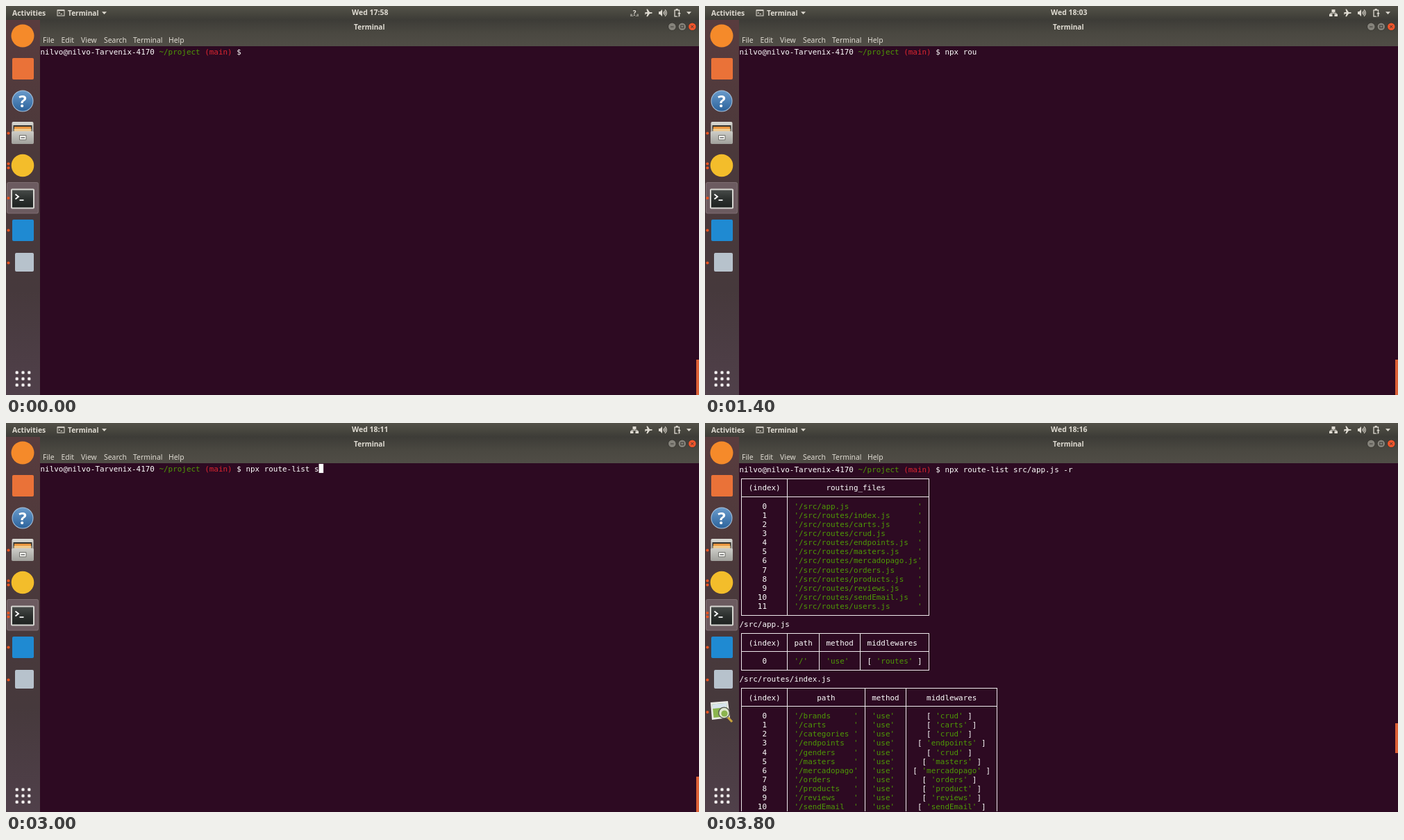
Animation, 998 px wide and 561 px high, one loop 6800 ms. Source, as an HTML page with a canvas:

```html
<!DOCTYPE html>
<html lang="en">
<head>
<meta charset="utf-8">
<title>Terminal</title>
<style>
  html, body { margin: 0; width: 100%; height: 100%; overflow: hidden; background: #2d0a22; }
  canvas { display: block; width: 998px; height: 561px; }
</style>
</head>
<body>
<canvas id="stage" width="998" height="561"></canvas>
<script>
const ctx = document.getElementById('stage').getContext('2d');
const W = 998, H = 561, LOOP = 6800, STEP = 200, RESULT_AT = 3800;
const CELL = 6.575, LINE = 13.15, LEFT = 49.5;
const MONO = '10.92px "DejaVu Sans Mono", monospace';
const SANS = '"Noto Sans", "Open Sans", sans-serif';
const WHITE = '#fff', GREEN = '#4e9a06', RED = '#dc2530', ORANGE = '#e95420', PALE = '#dfdbd2';

const PROMPT = [
  ['nilvo@nilvo-Tarvenix-4170 ', WHITE], ['~/project ', GREEN], ['(main) ', RED], ['$ ', WHITE]
];
const COMMAND = 'npx route-list src/app.js -r';

// [time, value] lists: typed length is interpolated, the others hold
const TYPED = [[0, 0], [1800, 9], [2000, 11], [3000, 16], [3600, 28]];
const CLOCK = [[0, '17:58'], [400, '17:59'], [800, '18:00'], [1000, '18:02'], [1200, '18:03'],
  [1600, '18:09'], [2000, '18:10'], [2600, '18:11'], [3200, '18:12'], [3400, '18:13'], [3800, '18:16']];
const ONLINE = [[0, false], [1200, true], [1600, false], [2400, true]];
const CURSOR = [[0, false], [200, true], [1400, false], [1600, true]];

const held = (list, t) => list.filter(k => k[0] <= t).pop()[1];

function typedLength(t) {
  const i = TYPED.findIndex(k => k[0] > t);
  if (i < 0) return COMMAND.length;
  const [t0, a] = TYPED[i - 1], [t1, b] = TYPED[i];
  return Math.round(a + (b - a) * (t - t0) / (t1 - t0));
}

function rect(x, y, w, h, fill, r = 0) {
  ctx.fillStyle = fill;
  ctx.beginPath();
  ctx.roundRect(x, y, w, h, r);
  ctx.fill();
}

function disc(x, y, r, fill) {
  ctx.fillStyle = fill;
  ctx.beginPath();
  ctx.arc(x, y, r, 0, Math.PI * 2);
  ctx.fill();
}

function poly(points, fill) {
  ctx.fillStyle = fill;
  ctx.beginPath();
  points.forEach(p => ctx.lineTo(...p));
  ctx.fill();
}

function stroke(points, color, width = 1) {
  ctx.strokeStyle = color;
  ctx.lineWidth = width;
  ctx.beginPath();
  points.forEach(p => ctx.lineTo(...p));
  ctx.stroke();
}

function fade(y0, y1, ...stops) {
  const g = ctx.createLinearGradient(0, y0, 0, y1);
  stops.forEach(([at, color]) => g.addColorStop(at, color));
  return g;
}

function label(text, x, y, font, color = PALE, align = 'left') {
  ctx.font = font;
  ctx.fillStyle = color;
  ctx.textAlign = align;
  ctx.fillText(text, x, y);
}

function caret(x, y) {
  poly([[x - 3.5, y - 1.8], [x + 3.5, y - 1.8], [x, y + 2]], PALE);
}

// ---- top panel and title bar ----

function networkIcon(online) {
  const color = online ? PALE : '#8d8b83';
  rect(902.5, 5, 5, 4, color);
  rect(899, 11.5, 4.5, 3.5, color);
  rect(906.5, 11.5, 4.5, 3.5, color);
  if (online) {
    stroke([[901, 12], [901, 10.3], [909, 10.3], [909, 12]], color);
    stroke([[905, 9], [905, 10.3]], color);
  } else {
    rect(902, 4, 6.5, 10, '#47463f');
    label('?', 905.2, 13.5, `bold 10px ${SANS}`, PALE, 'center');
  }
}

function statusIcons(online) {
  networkIcon(online);
  poly([[920, 8.9], [923.6, 8.9], [922.4, 4.6], [924, 4.6], [927, 8.9], [930, 9], [931, 9.9], [930, 10.8],
    [927, 10.9], [924, 15.2], [922.4, 15.2], [923.6, 10.9], [921.8, 10.9], [920.8, 12.2], [920, 12.2], [920.6, 9.9]], PALE);
  poly([[940, 8], [942, 8], [945, 5], [945, 15], [942, 12], [940, 12]], PALE);
  ctx.strokeStyle = PALE;
  ctx.lineWidth = 1.1;
  for (const r of [2, 4, 6]) {
    ctx.beginPath();
    ctx.arc(945.3, 10, r, -0.9, 0.9);
    ctx.stroke();
  }
  ctx.lineWidth = 1.3;
  ctx.strokeRect(963, 6, 6.5, 9);
  rect(964.7, 4, 3, 2, PALE);
  rect(966.5, 8.5, 6, 7, '#45443d');
  poly([[969.5, 8.5], [972, 11.3], [970.3, 11.3], [970.3, 15], [968.7, 15], [968.7, 11.3], [967, 11.3]], PALE);
  caret(983.5, 10);
}

function topBars(t) {
  const bold = `bold 10.4px ${SANS}`;
  rect(0, 0, W, 20, fade(0, 20, [0, '#535149'], [0.5, '#48473f'], [1, '#3d3c37']));
  rect(49, 20, 949, 38, fade(20, 58, [0, '#3d3c37'], [0.5, '#4a4841'], [1, '#504d46']));
  label('Activities', 9, 13.6, bold);
  ctx.strokeStyle = PALE;
  ctx.lineWidth = 1;
  ctx.strokeRect(74, 6, 10, 8);
  rect(74, 5.5, 10, 1.6, PALE);
  stroke([[75.8, 8.5], [77.5, 9.8], [75.8, 11]], PALE);
  stroke([[78.5, 11.5], [81, 11.5]], PALE);
  label('Terminal', 89, 13.6, `bold 10.1px ${SANS}`);
  caret(141.5, 10);
  label('Wed ' + held(CLOCK, t), 524.3, 13.4, `bold 10.5px ${SANS}`, PALE, 'center');
  statusIcons(held(ONLINE, t));

  label('Terminal', 523.3, 33.6, `bold 10.1px ${SANS}`, PALE, 'center');
  for (const [x, color] of [[959.3, '#85837b'], [973.8, '#85837b'], [988.3, '#f0552b']]) {
    disc(x, 29.8, 6, '#35342f');
    disc(x, 29.8, 5.3, color);
  }
  const ink = '#3c3b37';
  stroke([[957, 30], [961.6, 30]], ink);
  ctx.strokeRect(971.8, 28, 4, 3.6);
  stroke([[986.4, 27.9], [990.2, 31.7]], ink);
  stroke([[990.2, 27.9], [986.4, 31.7]], ink);

  const menu = { File: 53, Edit: 79.5, View: 108, Search: 141, Terminal: 183, Help: 234 };
  for (const name in menu) label(name, menu[name], 53.2, `10.4px ${SANS}`);
}

// ---- dock ----

function helpIcon() {
  disc(24, 137, 15.5, '#a9c4de');
  disc(24, 137, 14.5, fade(122, 152, [0, '#6a9bcb'], [1, '#2c639c']));
  label('?', 24, 145.5, 'bold 24px "Noto Sans", sans-serif', WHITE, 'center');
}

function filesIcon() {
  rect(8.5, 167, 31, 32, fade(167, 199, [0, '#d8d8d3'], [1, '#8e8e89']), 2);
  rect(10.5, 172, 27, 10, '#35322d');
  rect(12, 174, 24, 3, '#e8953f');
  rect(11.5, 177, 25, 5, '#f0c98a');
  rect(8, 180.5, 32, 18.5, fade(180, 199, [0, '#cfcfca'], [1, '#a0a09b']), 2);
  rect(19, 186, 10.5, 7.5, '#6f6f6a', 1);
  rect(20, 187, 8.5, 5.5, '#f4f4f0');
  rect(21.5, 189, 5.5, 1.6, '#777');
}

function terminalIcon() {
  rect(1, 254, 46, 45.5, '#7d6d71', 3);
  rect(2, 255, 44, 43.5, '#6c5b60', 2);
  rect(7, 263.5, 34, 29, '#d6d6d1', 2);
  rect(9, 265.5, 30, 25, fade(265, 291, [0, '#474b49'], [0.5, '#2c302e'], [1, '#1e2220']));
  stroke([[13.5, 271.5], [18, 275], [13.5, 278.5]], WHITE, 1.8);
  stroke([[19.5, 280], [25.5, 280]], WHITE, 1.7);
}

function viewerIcon() {
  poly([[8, 403], [33, 401], [36, 425], [10, 428]], '#ecece8');
  poly([[10.5, 405.5], [31, 403.8], [33, 423], [12.5, 425]], '#8bb44e');
  poly([[10.5, 405.5], [31, 403.8], [31.6, 410], [11.2, 412]], '#d8e4ec');
  stroke([[33, 424.5], [39, 431]], '#c8a43c', 3.2);
  disc(27.5, 418, 8.5, '#55584f');
  disc(27.5, 418, 7.2, '#dfe8cf');
  disc(28, 419, 4.6, '#8bb44e');
}

function dock(t) {
  rect(0, 20, 49, 541, fade(20, 561, [0, '#593c3e'], [0.35, '#4b393b'], [0.72, '#46393c'], [1, '#50404a']));
  disc(24, 43, 16.5, '#f58a2a');
  rect(9, 75, 31, 31, '#ea7238', 2);
  helpIcon();
  filesIcon();
  disc(24, 230, 16.3, '#f3bd2b');
  terminalIcon();
  rect(9, 308, 31, 31, '#1f8ad2', 2);
  rect(13, 356, 27, 27, '#b7c2cc', 2);
  const done = t >= RESULT_AT;
  if (done) viewerIcon();

  const shells = t >= 1800 ? [274, 279.5] : [277];
  const running = [183.5, 227.5, 233.5, ...shells, 323.5, 370.5];
  if (done) running.push(417);
  running.forEach(y => disc(3.5, y, 2.1, ORANGE));
  for (let i = 0; i < 9; i++) {
    rect(13.6 + (i % 3) * 8.8, 526.6 + Math.floor(i / 3) * 9, 4.2, 4.2, '#f4f0f0', 1.4);
  }
}

// ---- terminal ----

let top0;

function write(text, col, row, color = WHITE) {
  ctx.font = MONO;
  ctx.fillStyle = color;
  ctx.textAlign = 'left';
  [...text].forEach((ch, i) => {
    if (ch !== ' ') ctx.fillText(ch, LEFT + (col + i) * CELL, top0 + row * LINE + 10.6);
  });
}

function commandLine(length) {
  let col = 0;
  for (const [text, color] of PROMPT) {
    write(text, col, 0, color);
    col += text.length;
  }
  write(COMMAND.slice(0, length), col, 0);
  return col + length;
}

const quoted = (name, width = 0) => `'${name.padEnd(width)}'`;

// Quoted parts are green, everything around them white
function writeCell(text, col, row) {
  let at = col;
  for (const part of text.split(/('[^']*')/)) {
    write(part, at, row, part[0] === "'" ? GREEN : WHITE);
    at += part.length;
  }
}

function table(row, widths, head, rows) {
  const lineX = col => Math.floor(LEFT + (col + 0.5) * CELL);
  const lineY = r => Math.floor(top0 + (r + 0.5) * LINE);
  const edges = [0];
  widths.forEach(w => edges.push(edges[edges.length - 1] + w + 1));
  const last = row + 3 + rows.length;
  const x0 = lineX(0), x1 = lineX(edges[edges.length - 1]);
  for (const r of [row, row + 2, last]) rect(x0, lineY(r), x1 - x0 + 1, 1, '#eee9ec');
  for (const e of edges) rect(lineX(e), lineY(row), 1, lineY(last) - lineY(row), '#eee9ec');
  const line = (cells, r) => cells.forEach((text, i) =>
    writeCell(text, edges[i] + 1 + Math.floor((widths[i] - text.length) / 2), r));
  line(head, row + 1);
  rows.forEach((cells, i) => line([String(i), ...cells], row + 3 + i));
}

const FILES = 'index carts crud endpoints masters mercadopago orders products reviews sendEmail users'.split(' ');
const ROUTES = ('brands:crud carts:carts categories:crud endpoints:endpoints genders:crud masters:masters ' +
  'mercadopago:mercadopago orders:orders products:product reviews:reviews sendEmail:sendEmail users:users').split(' ');

function results() {
  const paths = ['/src/app.js', ...FILES.map(f => `/src/routes/${f}.js`)];
  const head = ['(index)', 'path', 'method', 'middlewares'];
  table(1, [9, 30], ['(index)', 'routing_files'], paths.map(p => [quoted(p, 26)]));
  write(paths[0], 0, 17);
  table(18, [9, 6, 8, 14], head, [["'/'", "'use'", "[ 'routes' ]"]]);
  write(paths[1], 0, 23);
  table(24, [9, 16, 8, 19], head, ROUTES.map(r => {
    const [path, handler] = r.split(':');
    return [quoted('/' + path, 12), "'use'", `[ ${quoted(handler)} ]`];
  }));
}

function terminal(t) {
  const done = t >= RESULT_AT;
  rect(49, 57.5, 949, 504, '#2d0a22');
  ctx.save();
  ctx.beginPath();
  ctx.rect(49, 57, 949, 503);
  ctx.clip();
  top0 = done ? 60.3 : 58.9;
  const end = commandLine(typedLength(t));
  if (done) results();
  else if (held(CURSOR, t)) rect(LEFT + end * CELL, top0, CELL, LINE, WHITE);
  ctx.restore();
  rect(994, done ? 433 : 510, 4, done ? 43 : 51, '#dd6136');
}

function frame(now) {
  const t = Math.floor((now % LOOP) / STEP) * STEP;
  ctx.clearRect(0, 0, W, H);
  terminal(t);
  dock(t);
  topBars(t);
  requestAnimationFrame(frame);
}
frame(performance.now());
</script>
</body>
</html>
```
